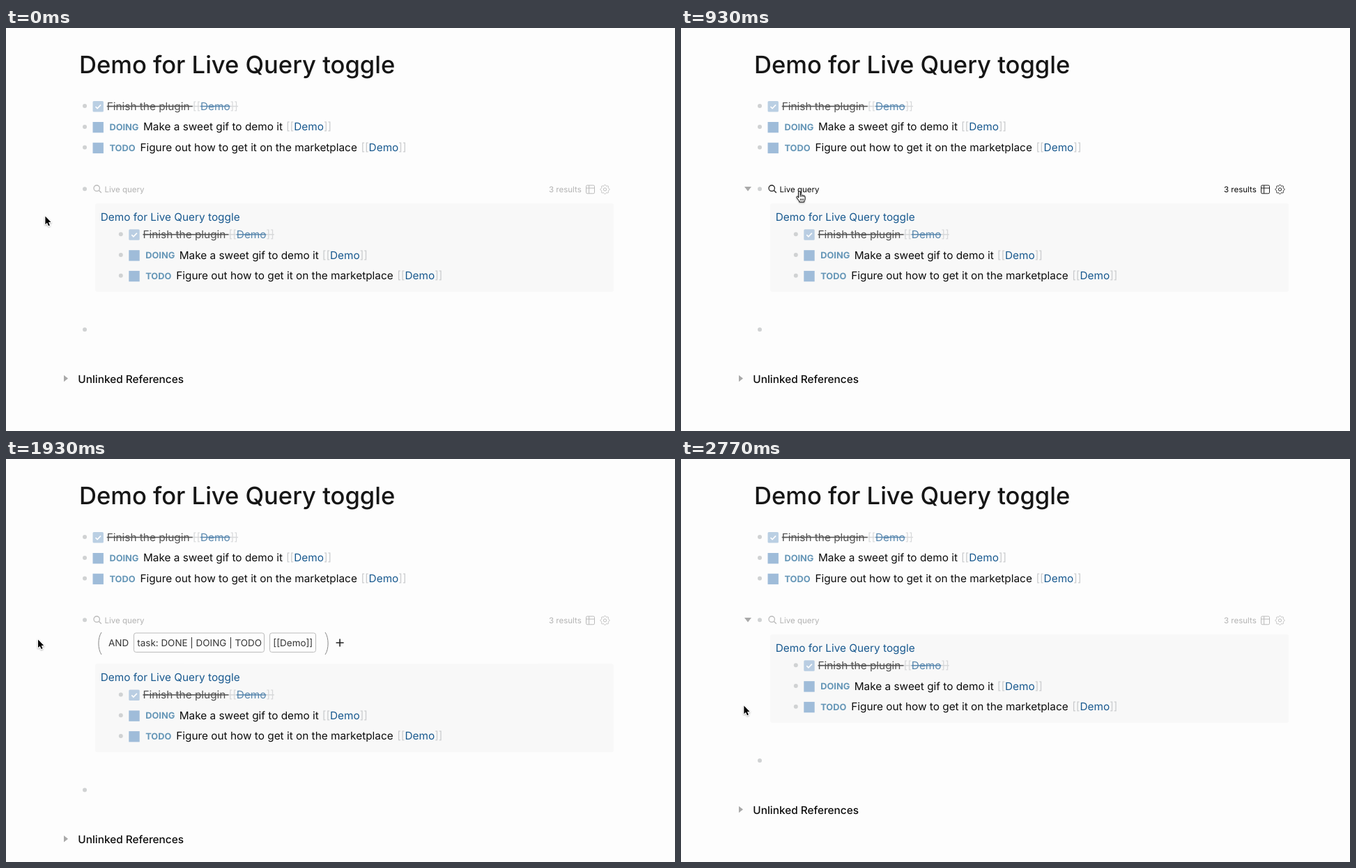
An HTML page that plays this animation: 960 px wide and 579 px high, repeating every 3200 ms.

```html
<!DOCTYPE html>
<html lang="en">
<head>
<meta charset="utf-8">
<title>Live query toggle</title>
<style>
  html, body { margin: 0; width: 100%; height: 100%; overflow: hidden; background: #fdfdfd; }
  svg { display: block; width: 100%; height: 100%; }
  text {
    font: 15.36px Inter, sans-serif; font-optical-sizing: none; fill: #0c0c0c;
    white-space: pre; text-rendering: geometricPrecision;
  }
  .title { font-size: 34.56px; font-weight: 500; fill: #161616; }
  .section { font-weight: 500; }
  .marker { font-size: 12.8px; font-weight: 700; fill: #6596b7; }
  .small { font-size: 11.52px; }
  .chip { font-size: 13.44px; fill: #333; }
  .link { fill: #18598f; }
  .bracket { fill: #c9cbcd; }
  .box { fill: #9fbcd9; }
  .bullet { fill: #d0d2d3; }
  .arrow { fill: #a9a9a9; }
  .line { fill: none; stroke: #222; }
  .done { opacity: .7; }
  .done tspan { text-decoration: line-through; }
</style>
</head>
<body>
<svg viewBox="0 0 960 579">
  <defs>
    <filter id="shadow" x="-50%" y="-50%" width="200%" height="200%">
      <feDropShadow dx="0" dy="1" stdDeviation=".8" flood-opacity=".35"/>
    </filter>
  </defs>

  <text class="title" x="105" y="65.4">Demo for Live Query toggle</text>
  <g id="tasks"></g>

  <path id="caret" class="arrow" d="M91 228H101L96 234.5Z"/>
  <circle class="bullet" cx="113" cy="231.2" r="3"/>
  <g id="header">
    <circle class="line" cx="130.2" cy="230.2" r="4.2" stroke-width="1.3"/>
    <path class="line" d="M133.3 233.3L136.8 236.8" stroke-width="1.3"/>
    <text class="small" x="141.4" y="235.7">Live query</text>
    <text class="small" x="779" y="235.7">3 results</text>
    <rect class="line" x="832.5" y="226" width="12" height="11.8" rx="1.6"/>
    <path class="line" d="M832.5 230H844.5M836.6 226V237.8"/>
    <path id="gear" class="line"/>
    <circle class="line" cx="859.5" cy="231.9" r="2.1"/>
  </g>

  <g id="builder">
    <path class="line" style="stroke:#888" d="M137 249C131.5 257 131.5 273 137 281M458 249C463.5 257 463.5 273 458 281"/>
    <rect class="line" style="stroke:#bbb" x="183.5" y="250" width="187" height="27.5" rx="3"/>
    <rect class="line" style="stroke:#bbb" x="378.5" y="250" width="66" height="27.5" rx="3"/>
    <text class="chip" x="147" y="268.6">AND</text>
    <text class="chip" x="188.3" y="268.6">task: DONE | DOING | TODO</text>
    <text class="chip" x="383.3" y="268.6">[[Demo]]</text>
    <path class="line" stroke-width="1.6" d="M473.6 264H484.6M479.1 258.5V269.5"/>
  </g>

  <g id="lower">
    <rect x="128" y="252" width="744" height="127" rx="3" fill="#f8f8f8"/>
    <text class="link" x="135.7" y="276.6">Demo for Live Query toggle</text>
    <use href="#tasks" x="51.8" y="184.2"/>
    <circle class="bullet" cx="113" cy="433.3" r="3"/>
    <path class="arrow" d="M83 498.8V508.2L89 503.5Z"/>
    <text class="section" x="103.3" y="509.6">Unlinked References</text>
  </g>

  <g id="cursor" filter="url(#shadow)" stroke-linejoin="round">
    <path id="pointer" stroke="#fff" stroke-width="1.8" paint-order="stroke"
      d="M.4 .6V12.2L3 9.8L5 14.2L6.9 13.4L5 9.1H8.6Z"/>
    <g id="beam" fill="none">
      <path stroke="#fff" stroke-width="2.4" d="M-3 -7Q0 -7 0 -5V5Q0 7 -3 7M3 -7Q0 -7 0 -5M0 5Q0 7 3 7M-2 2H2"/>
      <path stroke="#000" d="M-3 -7Q0 -7 0 -5V5Q0 7 -3 7M3 -7Q0 -7 0 -5M0 5Q0 7 3 7M-2 2H2"/>
    </g>
    <g id="hand" fill="#fff" stroke="#000">
      <path d="M-1.3 9V.8Q-1.1 -.5 0 -.5T1.3 .8V5.2Q2.3 4.3 3.6 5.3Q4.9 4.7 5.9 6Q7.9 5.5 8 7.5V10.5Q7.8 12.4 6.8 13.6V15H-.3V13.5Q-2.2 11.6 -4 8.6Q-4.6 7.2 -3.4 6.9T-1.3 9Z"/>
      <path fill="none" stroke-width=".8" d="M1.3 5V8M3.6 5.5V8M5.9 6.2V8M1.4 10V13M3.4 10V13M5.4 10V13"/>
    </g>
  </g>
</svg>
<script>
const LOOP = 3200;
const $ = id => document.getElementById(id);
const clamp = v => Math.min(1, Math.max(0, v));
const show = (id, on) => $(id).style.display = on ? '' : 'none';

function task(y, marker, textX, label, tagX) {
  const done = !marker;
  return `<circle class="bullet" cx="113" cy="${y}" r="3"/>
    <g class="${done ? 'done' : ''}">
      <rect class="box" x="124.5" y="${y - 6.9}" width="15.4" height="15.4" rx="${done ? 1.5 : 0}"/>
      ${done ? `<path class="line" style="stroke:#fff" stroke-width="1.7" d="M128.5 ${y + 1}l2.6 2.6l5 -5.2"/>`
             : `<text class="marker" x="148.4" y="${y + 5}">${marker}</text>`}
      <text x="${textX}" y="${y + 5.5}"><tspan>${label} </tspan><tspan class="bracket" x="${tagX}">[[</tspan><tspan
        class="link">Demo</tspan><tspan class="bracket">]]</tspan></text>
    </g>`;
}
$('tasks').innerHTML =
  task(112, '', 144.7, 'Finish the plugin', 267.8) +
  task(141.9, 'DOING', 196.9, 'Make a sweet gif to demo it', 402) +
  task(171.6, 'TODO', 192.4, 'Figure out how to get it on the marketplace', 509.4);

const rim = Array.from({ length: 96 }, (_, i) => {
  const a = i / 96 * 2 * Math.PI, r = 5.9 + .75 * Math.cos(8 * a);
  return `${859.5 + r * Math.cos(a)} ${231.9 + r * Math.sin(a)}`;
});
$('gear').setAttribute('d', `M${rim.join('L')}Z`);

// time, x, y, ease-out power on the way there
const path = [
  [0, 56, 270, 1], [330, 56, 270, 1], [630, 143, 247.4, 1.2], [830, 171, 236, 2],
  [930, 170, 235, 1], [1200, 170, 235, 1], [1370, 96, 253, 1], [1530, 45, 259, 2],
  [1930, 45, 259, 1], [2230, 179, 237, 1.5], [2500, 179, 237, 1],
  [2770, 90, 354, 1.5], [LOOP, 90, 354, 1]
];
function cursorAt(t) {
  const i = path.findIndex(k => k[0] > t);
  const [t0, x0, y0] = path[i - 1], [t1, x1, y1, power] = path[i];
  const u = 1 - (1 - (t - t0) / (t1 - t0)) ** power;
  return [x0 + (x1 - x0) * u, y0 + (y1 - y0) * u];
}

const fade = (t, from, to) => {
  const u = clamp((t - from) / (to - from));
  return 1 - (1 - u) ** 2;
};

function draw(t) {
  const open = t >= 970 && t < 2330;
  show('builder', open);
  $('lower').setAttribute('transform', `translate(0 ${open ? 42.2 : 0})`);

  const lit = fade(t, 650, 840) - fade(t, 1250, 1530) + fade(t, 2040, 2220) - fade(t, 2510, 2770);
  $('header').setAttribute('opacity', .3 + .7 * lit);

  const [x, y] = cursorAt(t);
  const shape = x < 125 ? 'pointer' : y < 243 ? 'hand' : 'beam';
  for (const id of ['pointer', 'beam', 'hand']) show(id, id === shape);
  $('cursor').setAttribute('transform', `translate(${x} ${y})`);
  show('caret', x > 80);
}

const start = performance.now();
function tick() {
  draw((performance.now() - start) % LOOP);
  requestAnimationFrame(tick);
}
tick();
</script>
</body>
</html>
```
